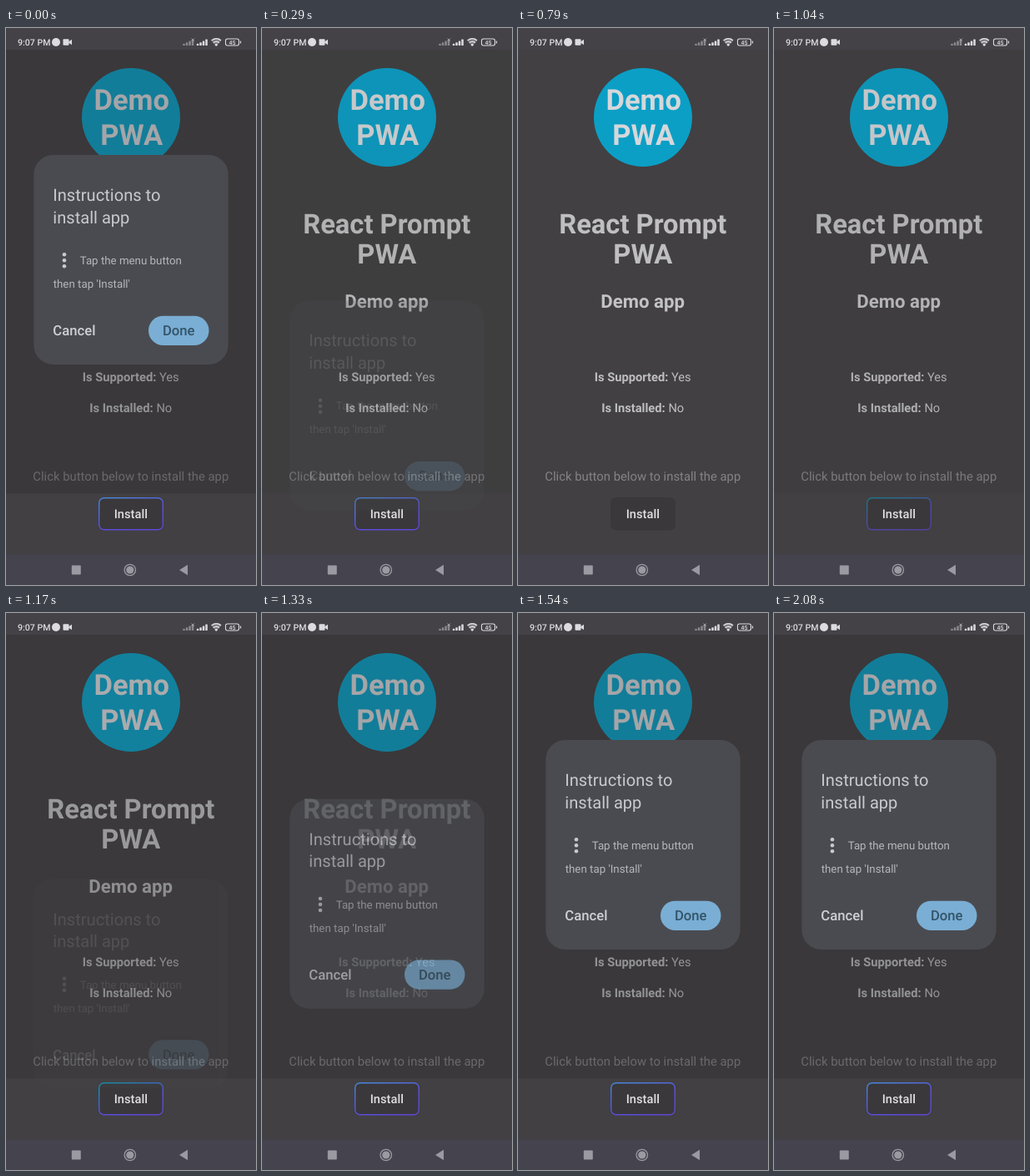
Recreate the animation shown at these times as an HTML page. Size 300 by 667 pixels, loop 2.12 s.

```html
<!DOCTYPE html>
<html lang="en">
<head>
<meta charset="utf-8">
<title>Install prompt</title>
<style>
  html, body { margin: 0; width: 100%; height: 100%; overflow: hidden; background: #424042; }
  svg { display: block; width: 300px; height: 667px; }
  text { font-family: Roboto, "Noto Sans", sans-serif; text-rendering: geometricPrecision; }
  .mid { text-anchor: middle; }
  .bold { font-weight: 700; }
  .medium { font-weight: 500; }
  .logo { font-size: 34.5px; fill: #d6d7da; }
  .heading { font-size: 32.7px; fill: #bfbfc1; }
  .sub { font-size: 22.2px; fill: #c3c3c5; }
  .body { font-size: 14.7px; fill: #bebec0; }
  .hint { font-size: 14.85px; fill: #848386; }
  .title { font-size: 20.1px; fill: #c9cacd; }
  .step { font-size: 13.3px; fill: #b6b7ba; }
  .action { font-size: 16.7px; fill: #cfd0d3; }
</style>
</head>
<body>
<svg viewBox="0 0 300 667">
  <defs>
    <linearGradient id="edge" x1=".2" y1="0" x2=".8" y2="1">
      <stop id="edgeStart" offset="0" stop-color="#4a84d6"/>
      <stop offset=".6" stop-color="#5a4fe0"/>
      <stop offset="1" stop-color="#5d48d6"/>
    </linearGradient>
  </defs>

  <rect width="300" height="667" fill="#424042"/>

  <!-- page -->
  <circle cx="150" cy="107" r="59" fill="#0b9fc6"/>
  <g class="mid">
    <text class="logo bold" x="150.7" y="98.4">Demo</text>
    <text class="logo bold" x="150.7" y="140.4">PWA</text>
    <text class="heading bold" x="149.8" y="245.6">React Prompt</text>
    <text class="heading bold" x="149.8" y="281.6">PWA</text>
    <text class="sub bold" x="149.6" y="334.8">Demo app</text>
    <text class="body" x="149.7" y="422.8"><tspan class="bold">Is Supported:</tspan> Yes</text>
    <text class="body" x="149.7" y="459.8"><tspan class="bold">Is Installed:</tspan> No</text>
    <text class="hint" x="149.8" y="541.6">Click button below to install the app</text>
  </g>

  <rect id="shade" y="26" width="300" height="531.5" fill="#262426"/>

  <!-- install button -->
  <rect x="111" y="562" width="78" height="39.5" rx="6.5" fill="#3a383b"/>
  <rect id="border" x="111.7" y="562.7" width="76.6" height="38.1" rx="6" fill="none" stroke="url(#edge)" stroke-width="1.4"/>
  <text class="mid medium" x="149.8" y="586.8" font-size="14.7" fill="#dfdfe1">Install</text>

  <!-- dialog -->
  <g id="dialog">
    <rect x="33.3" y="152" width="233.4" height="251" rx="23.5" fill="#4a4b50"/>
    <text class="title" x="56.3" y="207">Instructions to</text>
    <text class="title" x="56.3" y="233.5">install app</text>
    <g fill="#c9cacd">
      <circle cx="70" cy="271.3" r="2.3"/>
      <circle cx="70" cy="278.3" r="2.3"/>
      <circle cx="70" cy="285.3" r="2.3"/>
    </g>
    <text class="step" x="88.7" y="283">Tap the menu button</text>
    <text class="step" x="56.7" y="311">then tap 'Install'</text>
    <text class="action medium" x="56.3" y="368">Cancel</text>
    <rect x="171" y="344.7" width="72.5" height="35.3" rx="17.6" fill="#7aaed4"/>
    <text class="action medium mid" x="207.2" y="368" style="fill:#345468">Done</text>
  </g>

  <!-- status bar -->
  <rect width="300" height="26" fill="#444147"/>
  <text class="medium" x="14" y="21" font-size="10.6" fill="#dcdce0">9:07 PM</text>
  <g fill="#dcdce0">
    <circle cx="60" cy="17" r="5"/>
    <rect x="68.5" y="13.3" width="7" height="7.4" rx="1"/>
    <path d="M75 16.6L79 13.8V20.2L75 17.4Z"/>
    <g id="weak" opacity=".45"></g>
    <g id="strong"></g>
    <path d="M252.3 22L246 14.6Q252.3 9.4 258.6 14.6Z" opacity=".35"/>
    <circle cx="252.3" cy="20.2" r="1.4"/>
  </g>
  <g fill="none" stroke="#dcdce0">
    <path d="M246.6 15Q252.3 10.4 258 15M248.7 17.6Q252.3 14.8 255.9 17.6" stroke-width="1.5"/>
    <path d="M222.6 12.4L226 15.8M226 12.4L222.6 15.8" stroke-width=".8" opacity=".6"/>
    <rect x="263.5" y="13" width="16" height="8" rx="2.2" stroke-width="1.1"/>
    <path d="M281.5 15.5V18.5" stroke-width="1.2"/>
  </g>
  <text class="mid medium" x="271.5" y="19.6" font-size="7" fill="#dcdce0">45</text>

  <!-- navigation bar -->
  <rect y="630.5" width="300" height="37" fill="#45434e"/>
  <g fill="#9b99a1">
    <rect x="78.8" y="643.5" width="11" height="11" rx="1"/>
    <circle cx="148.8" cy="649" r="4.6"/>
    <circle cx="148.8" cy="649" r="6.7" fill="none" stroke="#9b99a1" stroke-width="1.3"/>
    <path d="M208 649L218 642.8V655.2Z"/>
  </g>
</svg>
<script>
  const LOOP = 2120;
  const HEIGHT = 251;
  const get = id => document.getElementById(id);
  const shade = get('shade'), dialog = get('dialog');
  const border = get('border'), edgeStart = get('edgeStart');

  // Each track lists [time, value] pairs joined by straight lines.
  const tracks = {
    open: [[0, 1], [20, 1], [410, 0], [1030, 0], [1449, 1], [LOOP, 1]],
    fade: [[0, 1], [20, 1], [350, 0], [1120, 0], [1435, 1], [LOOP, 1]],
    shade: [[0, 1], [40, 1], [400, 0], [960, 0], [1200, 1], [LOOP, 1]],
    border: [[0, 1], [560, 1], [780, 0], [950, 0], [1090, 1], [LOOP, 1]],
    teal: [[0, 0], [790, 0], [960, 1], [1170, 1], [1330, 0], [LOOP, 0]]
  };

  function at(track, t) {
    const i = track.findIndex(p => p[0] > t);
    const [t0, a] = track[i - 1], [t1, b] = track[i];
    return a + (b - a) * (t - t0) / (t1 - t0);
  }

  function mix(a, b, k) {
    return `rgb(${a.map((v, i) => Math.round(v + (b[i] - v) * k))})`;
  }

  function bars(id, x) {
    get(id).innerHTML = [2.2, 3.8, 5.6, 7.4].map((h, i) =>
      `<rect x="${x + i * 3.5}" y="${21 - h}" width="2.5" height="${h}" rx=".6"/>`).join('');
  }

  function draw(t) {
    dialog.setAttribute('opacity', at(tracks.fade, t));
    dialog.setAttribute('transform', `translate(0 ${(1 - at(tracks.open, t)) * HEIGHT})`);
    shade.setAttribute('opacity', .28 * at(tracks.shade, t));
    border.setAttribute('opacity', at(tracks.border, t));
    edgeStart.setAttribute('stop-color', mix([74, 132, 214], [20, 148, 178], at(tracks.teal, t)));
  }

  bars('weak', 212.3);
  bars('strong', 228.8);

  const start = performance.now();
  function tick() {
    draw((performance.now() - start) % LOOP);
    requestAnimationFrame(tick);
  }
  draw(0);
  requestAnimationFrame(tick);
</script>
</body>
</html>
```
